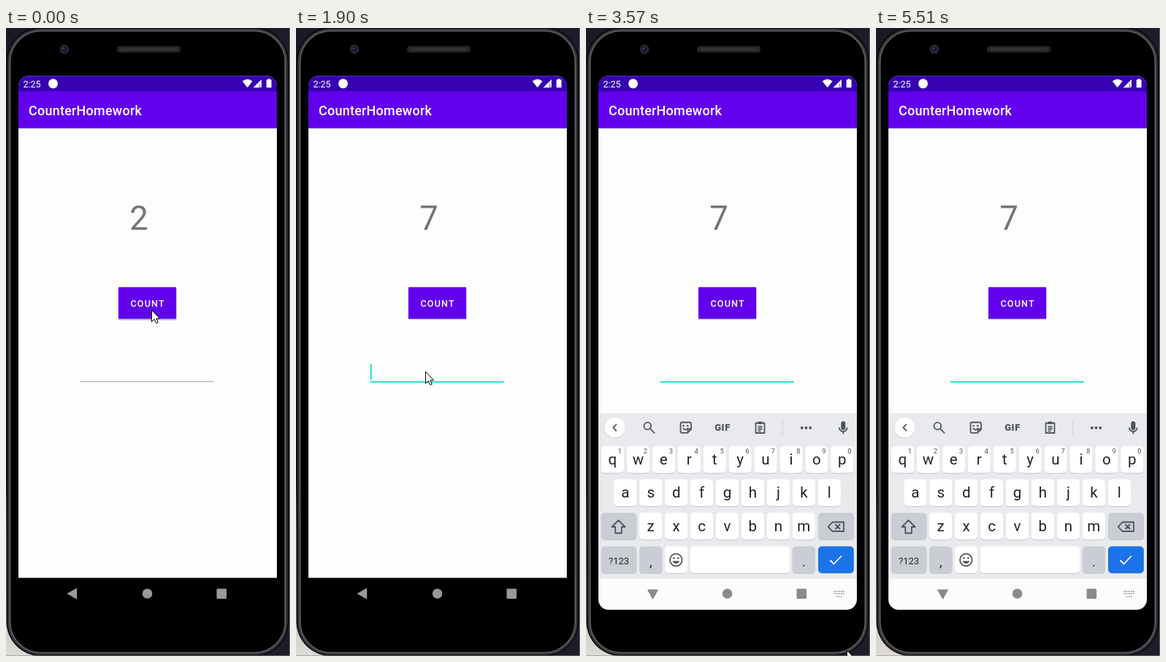
An HTML page that plays this animation: 389x856 px, repeating every 5630 ms.

```html
<!DOCTYPE html>
<html lang="en">
<head>
<meta charset="utf-8">
<title>Counter</title>
<style>
  html, body { margin: 0; width: 100%; height: 100%; overflow: hidden; background: #1b1925; }
  svg { display: block; width: 389px; height: 856px; font-family: Roboto, sans-serif; }
  .mid { text-anchor: middle; }
  .line { fill: none; stroke: #50545a; stroke-width: 1.8; stroke-linejoin: round; }
</style>
</head>
<body>
<svg viewBox="0 0 389 856">
  <defs>
    <linearGradient id="desk" x2="0" y2="1">
      <stop offset=".72" stop-color="#1b1925"/>
      <stop offset=".8" stop-color="#aaa7a5"/>
      <stop offset="1" stop-color="#dedad6"/>
    </linearGradient>
    <clipPath id="screen"><rect x="17" y="65.3" width="354" height="727.7" rx="14"/></clipPath>
  </defs>

  <!-- phone body -->
  <rect width="389" height="856" fill="#1f1b29"/>
  <rect width="60" height="856" fill="url(#desk)"/>
  <rect x=".5" y="-1" width="387" height="857" rx="47" fill="#0a0a0c"/>
  <rect x="4.5" y="3" width="379" height="849.500" rx="43" fill="none" stroke="#36383c" stroke-width="4"/>
  <rect x="5.500" y="4" width="377" height="847.500" rx="42" fill="none" stroke="#64676c" stroke-width="1.200"/>
  <rect x="7" y="5.500" width="374" height="844.500" rx="40.500"/>
  <path d="M388.5 0V856M0 855.5H389" stroke="#85848a" opacity=".6"/>
  <rect x="152" y="24.5" width="87" height="9" rx="4" fill="#232427"/>
  <rect x="156" y="27" width="79" height="4" rx="2" fill="#303135"/>
  <circle cx="80" cy="29" r="6.5" fill="#25272d"/>
  <circle cx="80" cy="29" r="3.2" fill="#141a38"/>
  <circle cx="79" cy="28" r="1.1" fill="#4b558a"/>

  <!-- app -->
  <g clip-path="url(#screen)">
    <rect x="17" y="65" width="354" height="684.5" fill="#fdfdfd"/>
    <rect x="17" y="136" width="354" height="2" fill="#e9e6f0"/>
    <rect x="17" y="86" width="354" height="50.6" fill="#6200ee"/>
    <rect x="17" y="65" width="354" height="21.3" fill="#3700b3"/>
  </g>
  <g fill="#fff">
    <text x="23.4" y="80.5" font-size="12.6">2:25</text>
    <circle cx="64.5" cy="75.8" r="6.5"/>
    <path d="M330.7 81.3L323.8 72.5Q330.7 67 337.6 72.5Z"/>
    <path d="M350 70V81.3H338.7Z"/>
    <path d="M346.6 74V81.3H350" fill="#3700b3" opacity=".45"/>
    <path d="M358.6 69.3h3v1.2h2v10.8h-6.9V70.5h1.9z"/>
    <text x="31" y="118.8" font-size="18" font-weight="500" letter-spacing=".225">CounterHomework</text>
  </g>
  <text id="count" class="mid" x="182" y="275.1" font-size="45.6" fill="#757575"></text>
  <rect id="shade" x="153.5" y="355" width="80" fill="#000" opacity=".14"/>
  <rect x="154" y="396" width="79" height="1.5" fill="#000" opacity=".2"/>
  <rect x="154" y="353.3" width="79.2" height="43" rx=".8" fill="#6200ee"/>
  <text x="170.5" y="380" font-size="12.6" font-weight="500" letter-spacing="1.125" fill="#fff">COUNT</text>
  <rect id="field" x="101.7" width="183"/>
  <rect id="caret" x="101.8" y="458.3" width="1.7" height="21.5" fill="#03dac5"/>

  <g id="keyboard" clip-path="url(#screen)">
    <rect x="17" y="525" width="354" height="226" fill="#e8eaee"/>
    <rect x="17" y="750.5" width="354" height="43" fill="#fcfcfc"/>
    <g id="keys"></g>
    <circle cx="39.5" cy="545.6" r="14" fill="#c9ccd1"/>
    <circle cx="39.5" cy="544.7" r="13.8" fill="#fff"/>
    <g class="line">
      <path d="M41.8 540l-4.5 4.7 4.5 4.7"/>
      <circle cx="84.3" cy="542.5" r="4.8"/>
      <path d="M88 546.3l6 6"/>
      <path d="M131.5 537.5H142q2 0 2 2V547l-5 4.8H131.5q-2 0-2-2V539.5q0-2 2-2zM144 546.5h-4.5v5"/>
      <path d="M132.7 545.5q3.5 4 7 0"/>
      <path d="M232.5 538.5h12v13.5h-12zM235.5 543.5h6M235.5 546.5h6M235.5 549.3h4"/>
      <path d="M235.5 538.3h6" stroke-width="3.5"/>
      <path d="M346.8 544.5a5.5 5.5 0 0 0 11 0M352.3 550v3.5"/>
      <path d="M44.5 671l9 9h-4.7v8.5h-8.6V680h-4.7z"/>
      <path d="M337.5 673.5h15.5v12.5h-15.5l-5.8-6.2zM341.5 676.5l6.5 6.5M348 676.5l-6.5 6.5"/>
      <circle cx="123.3" cy="725" r="8.3"/>
      <path d="M118.8 727q4.5 5.5 9 0z" fill="#50545a" stroke-width="1"/>
      <path d="M334.5 725.5l5 5 10.5-11" stroke="#fff"/>
      <path d="M269.5 534.5V555" stroke="#d0d3d8" stroke-width="1"/>
    </g>
    <g fill="#50545a">
      <circle cx="133.5" cy="542.3" r="1.2"/><circle cx="139.2" cy="542.3" r="1.2"/>
      <circle cx="120.3" cy="722.5" r="1.3"/><circle cx="126.3" cy="722.5" r="1.3"/>
      <circle cx="295.8" cy="545" r="1.9"/><circle cx="301.5" cy="545" r="1.9"/><circle cx="307.2" cy="545" r="1.9"/>
      <rect x="349.3" y="536" width="6" height="12" rx="3"/>
      <text class="mid" x="187" y="549.3" font-size="13" font-weight="900" letter-spacing=".6">GIF</text>
    </g>
  </g>

  <g id="nav">
    <path id="back" d="M84.6 771L96.6 764.3V777.7Z" stroke-width="1.2" stroke-linejoin="round"/>
    <circle cx="193.6" cy="771" r="6.8"/>
    <rect x="288.5" y="764.3" width="13.6" height="13.6" rx="1.3"/>
    <path id="switcher" d="M339.5 768H354M339.5 771.2H354M342.5 774.8H351" fill="none" stroke-width="1.8" stroke-dasharray="1.9 1.2"/>
  </g>
  <path id="mouse" d="M.5 .5V16.5L4.2 13L6.8 18.5L9.3 17.5L6.9 12H11.5Z" fill="#fff" stroke="#000"/>
</svg>
<script>
const $ = id => document.getElementById(id);
const LOOP = 5630;

function add(tag, attrs, text = "") {
  const el = document.createElementNS("http://www.w3.org/2000/svg", tag);
  for (const k in attrs) el.setAttribute(k, attrs[k]);
  el.textContent = text;
  $("keys").append(el);
}

function key(x, y, label = "", width = 31.3, fill = "#fff", size = 20.5, base = 25) {
  const box = { x, width, height: 36.5, rx: 5 };
  add("rect", { ...box, y: y + 1, fill: "#c3c6cb" });
  add("rect", { ...box, y, fill });
  add("text", { x: x + width / 2, y: y + base, class: "mid", "font-size": size, fill: "#202124" }, label);
}

const PITCH = 34.93, GREY = "#cacdd4";
[..."qwertyuiop"].forEach((c, i) => {
  key(20.8 + i * PITCH, 570, c);
  add("text", { x: 46.5 + i * PITCH, y: 580, class: "mid", "font-size": 9.5, fill: "#50545a" }, (i + 1) % 10);
});
[..."asdfghjkl"].forEach((c, i) => key(38.2 + i * PITCH, 615.3, c));
[..."zxcvbnm"].forEach((c, i) => key(73 + i * PITCH, 660.7, c));
key(20.8, 660.7, "", 48.5, GREY);
key(318, 660.7, "", 48.8, GREY);
key(20.8, 706.5, "?123", 48.5, GREY, 13, 24);
key(73, 706.5, ",", 31.3, GREY, 18, 27);
key(107.8, 706.5);
key(142.5, 706.5, "", 136.8);
key(282.7, 706.5, ".", 31.3, GREY, 18, 27);
key(318, 706.5, "", 48.8, "#1a73e8");

// Each track holds its value until the next time is reached.
const counts = [[0, 2], [150, 3], [270, 4], [540, 5], [690, 6], [840, 7]];
const carets = [[0, 0], [1900, 1], [2430, 0], [2730, 1], [3270, 0], [3870, 1], [4300, 0], [4850, 1], [5360, 0]];
const turns = [[0, 0], [2730, -45], [2850, -90]];
const greys = [[0, "#999"], [3150, "#8a8a8a"], [3270, "#777"], [3420, "#606060"], [3570, "#8b8b8b"]];
const mouse = [
  [0, 199, 384], [1080, 194, 395], [1230, 188, 425], [1350, 182, 449], [1500, 177, 468],
  [3000, 189, 412], [3150, 285, 540], [3270, 368, 687], [3420, 362, 839], [3570, 357, 848],
  [3720, -50, 0], [4700, 304, 763], [4850, 296, 695], [5000, 289, 627], [5120, 294, 655],
  [5240, 312, 740], [5360, 334, 840], [5510, -50, 0]
];
const at = (track, t) => track.findLast(step => step[0] <= t).slice(1);
const show = (id, on) => $(id).setAttribute("visibility", on ? "visible" : "hidden");

function set(id, attrs) {
  for (const k in attrs) $(id).setAttribute(k, attrs[k]);
}

function draw(now) {
  const t = now % LOOP, focused = t >= 1650;
  $("count").textContent = at(counts, t)[0];
  set("shade", { height: t < 690 ? 43.7 : 42 });
  set("field", focused ? { y: 481.5, height: 1.8, fill: "#03dac5" } : { y: 481.3, height: 1.2, fill: "#aaa" });
  show("caret", at(carets, t)[0]);
  show("keyboard", t >= 3570);
  show("switcher", t >= 2430);
  const [fill] = at(greys, t), [turn] = at(turns, t);
  set("nav", { fill });
  set("back", { stroke: fill, transform: `rotate(${turn} 91.5 771)` });
  set("switcher", { stroke: t < 3570 ? "#666" : "#a5a5a5" });
  set("mouse", { transform: `translate(${at(mouse, t)})` });
  requestAnimationFrame(draw);
}
draw(performance.now());
</script>
</body>
</html>
```
